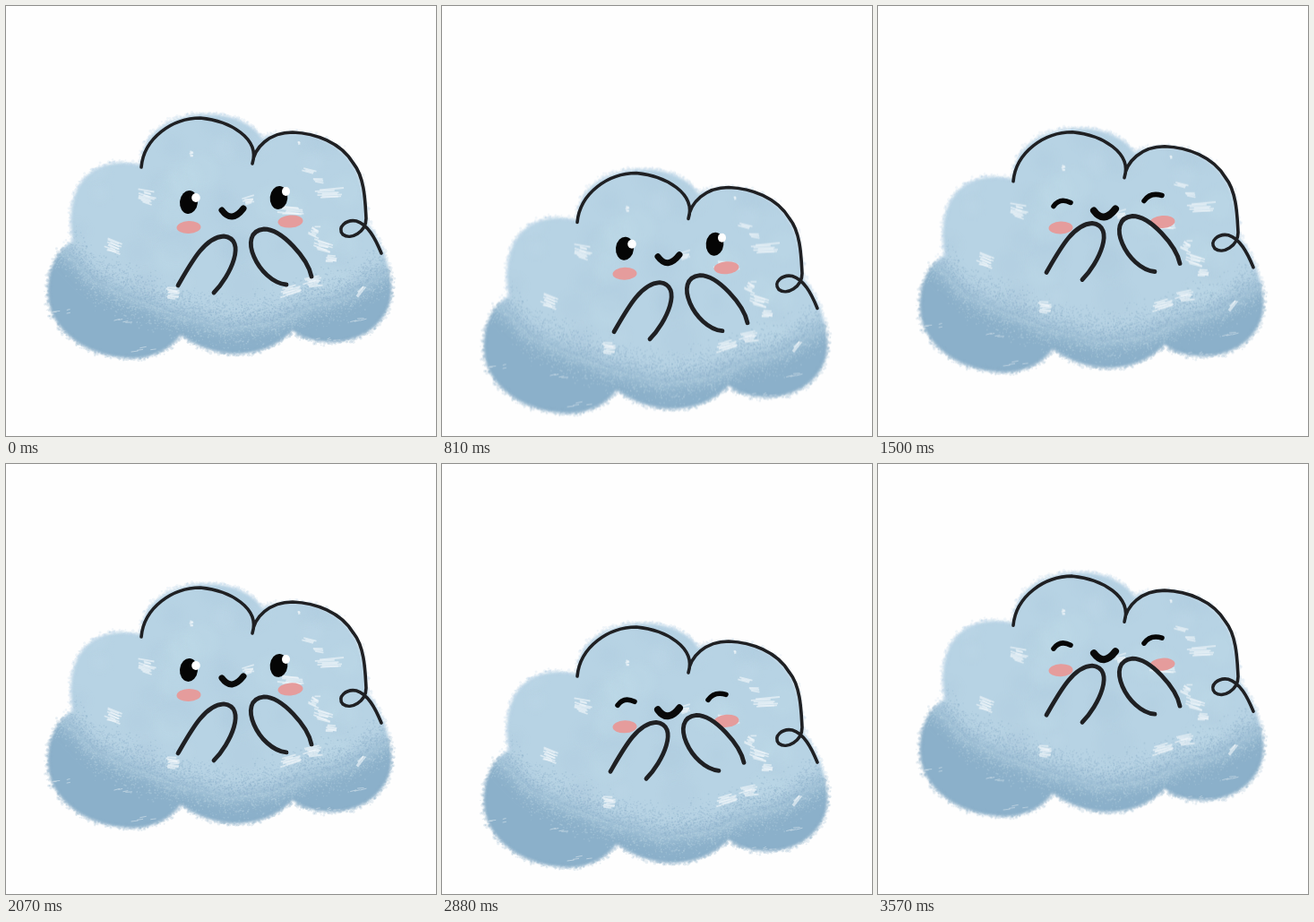
Recreate the animation shown at these times as an HTML page with a canvas. Size 480x480 px, loop 3600 ms.

```html
<!DOCTYPE html>
<html>
<head>
<meta charset="utf-8">
<style>
html, body { margin: 0; height: 100%; overflow: hidden; background: #fefefe; }
canvas { display: block; width: 480px; height: 480px; }
</style>
</head>
<body>
<canvas id="stage" width="480" height="480"></canvas>
<script>
const ctx = document.getElementById('stage').getContext('2d');
const LIGHT = '#b7d3e4', DARK = '#8bb0ca', INK = '#1f2023';

const bodyPath = `M151 177C151 140 186 121 225 121C255 121 278 134 286 148C302 140 332 139 352 148
  C386 162 402 192 402 240C418 262 430 290 430 318C430 350 400 376 360 375C340 374 328 369 320 362
  C305 378 283 388 258 388C232 388 210 378 195 367C182 385 160 394 138 393C88 391 46 360 47 318
  C47 292 58 272 75 262C68 225 76 176 130 175Z`;
const outline = new Path2D(`M151 180C154 147 186 125 217 125C250 128 284 148 275 176C277 158 294 141 320 141
  C345 142 374 152 388 176C401 192 401 222 402 237C402 252 385 262 376 255C369 247 380 238 391 240
  C404 244 412 259 419 276`);
const arms = new Path2D(`M192 312C207 286 222 258 243 257C270 260 250 302 232 320
  M341 302C337 282 308 249 288 249C256 252 282 308 313 311`);
const mouth = new Path2D('M241 228Q252 243 265 226');
const closedEyes = new Path2D('M196 223Q203 213 215 219M297 217Q304 207 317 211');

// x, y pairs along the top of the shaded underside
const shade = [40, 245, 75, 278, 100, 304, 145, 323, 190, 340, 250, 355, 300, 348, 340, 331, 380, 320, 405, 304, 440, 285];

// x, y, width, height, tilt of the dry brush marks
const marks = [
  [157, 213, 22, 13, .2], [120, 269, 20, 13, .4], [186, 321, 17, 12, .1], [207, 165, 5, 6, 0],
  [361, 210, 33, 9, 0], [349, 195, 14, 4, 0], [338, 185, 20, 4, .3], [318, 229, 30, 9, .1],
  [270, 218, 16, 8, -.2], [327, 153, 3, 3, 0], [345, 252, 14, 10, .4], [353, 268, 24, 10, .3],
  [362, 283, 15, 8, .2], [342, 308, 22, 10, -.2], [317, 318, 26, 9, -.3], [396, 318, 16, 4, -1]
];

let seed = 7;
function rand() {
  seed = (seed * 16807) % 2147483647;
  return seed / 2147483647;
}
const spread = size => (rand() + rand() + rand() - 1.5) * size;

function shadeY(x) {
  let i = 0;
  while (i < shade.length - 4 && x > shade[i + 2]) i += 2;
  const [x0, y0, x1, y1] = shade.slice(i, i + 4);
  return y0 + (y1 - y0) * (x - x0) / (x1 - x0);
}

function dot(c, x, y, r) {
  c.beginPath();
  c.arc(x, y, r, 0, 7);
  c.fill();
}

function paintShade(c) {
  c.filter = 'blur(9px)';
  c.fillStyle = DARK;
  c.beginPath();
  for (let x = 20; x <= 460; x += 5) c.lineTo(x, shadeY(x) + 4);
  c.lineTo(460, 480);
  c.lineTo(20, 480);
  c.fill();
  c.filter = 'none';
  c.globalAlpha = .32;
  for (let i = 0; i < 6500; i++) {
    const x = 45 + rand() * 390, d = spread(26);
    c.fillStyle = d < 4 ? DARK : LIGHT;
    dot(c, x, shadeY(x) + d, .4 + rand() * .6);
  }
}

function paintMottling(c) {
  c.filter = 'blur(4px)';
  c.globalAlpha = .13;
  for (let i = 0; i < 40; i++) {
    c.fillStyle = i % 2 ? '#9fc2d8' : '#cbe3ee';
    dot(c, 80 + rand() * 320, 125 + rand() * 205, 7 + rand() * 14);
  }
  c.filter = 'none';
}

function paintMarks(c) {
  c.strokeStyle = '#f4f9fc';
  c.lineWidth = 1.8;
  for (const [x, y, w, h, tilt] of marks) {
    c.save();
    c.translate(x, y);
    c.rotate(tilt);
    c.globalAlpha = .6;
    for (let row = -h / 2; row <= h / 2; row += 1.4) {
      c.beginPath();
      c.moveTo(-w / 2 + rand() * w * .35, row);
      c.lineTo(w / 2 - rand() * w * .35, row + spread(2));
      c.stroke();
    }
    c.restore();
  }
  // faint scratches near the lower edges
  c.lineWidth = 1;
  c.globalAlpha = .45;
  for (const [x, y] of [[135, 352], [148, 387], [62, 343], [357, 371], [392, 352]]) {
    for (let i = 0; i < 4; i++) {
      const sx = x + spread(14), sy = y + spread(6);
      c.beginPath();
      c.moveTo(sx, sy);
      c.lineTo(sx + 3 + rand() * 5, sy - rand() * 2);
      c.stroke();
    }
  }
}

function paintFuzz(c) {
  const edge = document.createElementNS('http://www.w3.org/2000/svg', 'path');
  edge.setAttribute('d', bodyPath);
  const length = edge.getTotalLength();
  c.globalAlpha = .2;
  for (let s = 0; s < length; s += .6) {
    const { x, y } = edge.getPointAtLength(s);
    c.fillStyle = y > shadeY(x) ? DARK : LIGHT;
    dot(c, x + spread(4), y + spread(4), .7 + rand() * 1.2);
  }
}

function makeCloud() {
  const layer = document.createElement('canvas');
  layer.width = layer.height = 480;
  const c = layer.getContext('2d'), body = new Path2D(bodyPath);
  c.filter = 'blur(1.4px)';
  c.fillStyle = LIGHT;
  c.fill(body);
  c.globalCompositeOperation = 'source-atop';
  c.filter = 'none';
  paintMottling(c);
  c.globalAlpha = 1;
  paintShade(c);
  paintMarks(c);
  c.globalCompositeOperation = 'source-over';
  paintFuzz(c);
  return layer;
}

function ellipse(color, x, y, rx, ry, tilt = 0) {
  ctx.fillStyle = color;
  ctx.beginPath();
  ctx.ellipse(x, y, rx, ry, tilt, 0, 7);
  ctx.fill();
}

function stroke(path, width, color) {
  ctx.lineWidth = width;
  ctx.strokeStyle = color;
  ctx.stroke(path);
}

function drawFace(laughing) {
  ellipse('#e59c9c', 204, 247, 13.5, 7, -.04);
  ellipse('#e59c9c', 317.5, 240.5, 14, 7, -.08);
  if (laughing) {
    stroke(closedEyes, 5.5, '#060606');
  } else {
    ellipse('#050505', 204, 219, 10, 13, .1);
    ellipse('#050505', 304.5, 214, 9.8, 13, .1);
    ellipse('#fff', 212, 214, 4.8, 5);
    ellipse('#fff', 312.5, 207, 4.5, 5);
  }
  stroke(mouth, laughing ? 8 : 7, '#0a0a0a');
  if (laughing) ctx.translate(-4, -15);
  stroke(arms, 4.8, INK);
}

const cloud = makeCloud();
ctx.lineCap = ctx.lineJoin = 'round';

function draw() {
  const t = Math.floor(performance.now() / 30) * 30 % 1800;
  const drop = (1 - Math.cos(t / 900 * Math.PI)) / 2;
  const laughing = t >= 900;

  ctx.fillStyle = '#fefefe';
  ctx.fillRect(0, 0, 480, 480);
  ctx.save();
  ctx.translate(0, 63 * drop);
  ctx.drawImage(cloud, 0, 0);
  stroke(outline, 3.6, INK);
  ctx.restore();

  ctx.save();
  ctx.translate(0, laughing ? 70 * drop - 17 : 53 * drop);
  drawFace(laughing);
  ctx.restore();
  requestAnimationFrame(draw);
}
draw();
</script>
</body>
</html>
```
